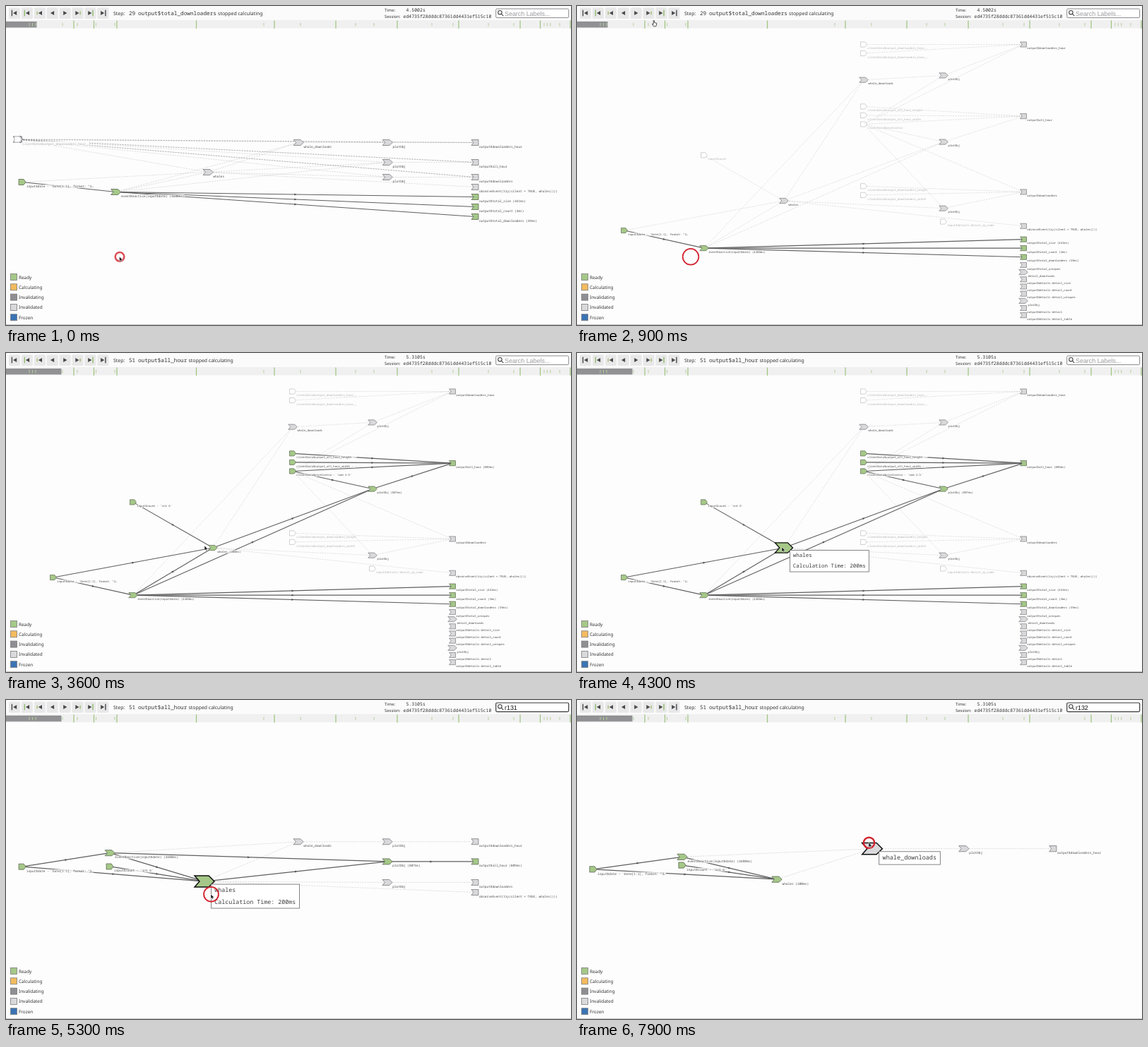
An HTML page with a canvas for the animation above (8 s loop, 800 by 452 pixels).

```html
<!DOCTYPE html>
<html lang="en">
<head>
<meta charset="utf-8">
<title>Reactive graph</title>
<style>
html, body { margin: 0; width: 100%; height: 100%; overflow: hidden; background: #fdfdfd; }
canvas { display: block; width: 800px; height: 452px; }
</style>
</head>
<body>
<canvas id="stage"></canvas>
<script>
const LOOP = 8000;
const STEP_AT = 1450, HOVER_1 = 3800, FILTER_1 = 4620, HOVER_2 = 7400, FILTER_2 = 7720;
const MONO = '"Noto Sans Mono", "DejaVu Sans Mono", monospace';
const SANS = '"Noto Sans", "Open Sans", sans-serif';
const UI = '"Liberation Sans", Arial, sans-serif';
const BG = '#fdfdfd', INK = '#333', GREEN = '#a5c888', GREY = '#d9d9dc';

const canvas = document.getElementById('stage');
const ctx = canvas.getContext('2d');
const dpr = window.devicePixelRatio || 1;
canvas.width = 800 * dpr;
canvas.height = 452 * dpr;

const clamp = v => Math.max(0, Math.min(1, v));
const ease = v => { const p = clamp(v); return p * p * (3 - 2 * p); };
const mix = (a, b, p) => a + (b - a) * p;
const clip = s => s.length > 36 ? s.slice(0, 35) + '…' : s;

// Each layout is a grid: x of a column, y of the first row, row height, zoom
const layouts = [
  { x: c => 23 + 128.2 * c + 1.1 * c * (5 - c), top: 193.5, row: 14, zoom: 1 },
  { x: c => 67 + 113 * c, top: 54.5, row: 12.55, zoom: .895 },
  { x: c => [23, 147, 281, 414, 540, 664][c], top: 201, row: 14, zoom: 1 },
  { x: c => [23, 159, 293, 438, 587, 723][c], top: 211, row: 14, zoom: 1.12 },
];
const starts = [50, FILTER_1, FILTER_2];
const NEW = [17, 189];

const nodes = [];
const byId = {};

// ready: 0 never, 1 always, 2 after the step; rows: one per layout, null for a node not yet placed
function node(id, kind, label, ready, col, rows, late = label) {
  const ghost = kind === 'in' && ready !== 1;
  nodes.push(byId[id] = { kind, label: clip(label), late: clip(late), ready, col, rows, ghost });
}

['$total_uniques', 'detail_downloads', '$details-detail_size', '$details-detail_count',
 '$details-detail_uniques', 'plotObj', '$details-detail', '$details-detail_table'].forEach((s, i) => {
  const out = s[0] === '$';
  node('d' + i, out ? 'out' : 'mid', out ? 'output' + s : s, 0, 5, [null, 24.9 + .81 * i]);
});

node('ip', 'in', 'input$details-detail_ip_name', 0, 4, [null, 20]);
node('n', 'in', 'input$count', 2, 1, [null, 12.5, 2.5, 0], "input$count - 'int 6'");
node('px', 'in', 'clientData$pixelratio', 2, 3, [null, 9], "clientData$pixelratio - 'num 2.5'");
[['l', 'downloaders', 16, 0], ['a', 'all_hour', 7, 2], ['h', 'downloaders_hour', 0, 0]]
  .forEach(([id, name, row, ready]) => ['width', 'height'].forEach((side, i) => {
    const label = `clientData$output_${name}_${side}`;
    node(id + side[0], 'in', label, ready, 3, [null, row + 1 - i], label + (ready ? ' - int' : ''));
  }));

node('date', 'in', 'input$date - \'Date[1:1], format: "2019"', 1, 0, [4, 21, 2.5, 2.5]);
node('event', 'mid', 'eventReactive(input$date) (4480ms)', 1, 1, [5, 23, 1.1, 2]);
node('whales', 'mid', 'whales', 2, 2, [3, 17.65, 4, 1.1], 'whales (200ms)');
node('wd', 'mid', 'whale_downloads', 0, 3, [0, 4, 0, 2.5]);
node('p1', 'mid', 'plotObj', 0, 4, [0, 3.5, 0, 2.5]);
node('p2', 'mid', 'plotObj', 2, 4, [2, 11, 2], 'plotObj (807ms)');
node('p3', 'mid', 'plotObj', 0, 4, [3.5, 18.5, 4.1]);
node('o1', 'out', 'output$downloaders_hour', 0, 5, [0, 0, 0, 2.5]);
node('o2', 'out', 'output$all_hour', 2, 5, [2, 8.1, 2], 'output$all_hour (809ms)');
node('o3', 'out', 'output$downloaders', 0, 5, [3.5, 16.65, 4.1]);
node('obs', 'out', 'x', 0, 5, [4.5, 20.5, 5.1]);
byId.obs.label = byId.obs.late = 'observeEvent(try(silent = TRUE, whales()))';
['size (441ms)', 'count (3ms)', 'downloaders (39ms)'].forEach((s, i) =>
  node('t' + i, 'out', 'output$total_' + s, 1, 5, [5.5 + i, 22 + i]));

const edges = ('date-event date-whales n-whales event-whales event-wd whales-wd event-p2 whales-p2 ' +
  'whales-p3 whales-obs wd-p1 p1-o1 p2-o2 p3-o3 hh-o1 hw-o1 ah-o2 aw-o2 lh-o3 lw-o3 ' +
  'px-p1 px-o1 px-p2 px-o2 px-p3 px-o3 event-t0 event-t1 event-t2')
  .split(' ').map(s => s.split('-').map(id => byId[id]));

const shapes = {
  in: [[-5, -4], [2, -4], [5, 0], [2, 4], [-5, 4]],
  mid: [[-7, -4], [3, -4], [7, 0], [3, 4], [-7, 4], [-3.5, 0]],
  out: [[-5, -4], [5, -4], [5, 4], [-5, 4], [-2, 0]],
};
const arrow = [[0, 0], [0, 6.6], [1.5, 5.3], [2.5, 7.6], [3.6, 7.1], [2.6, 4.9], [4.7, 4.8]];
const hand = [[0, 0], [1.2, 0], [1.5, 2.8], [4.6, 3.6], [4.4, 6.2], [3.5, 8], [.4, 8], [-1.8, 4.8], [0, 5]];

// Pointer travel: start, end, x, y
const travel = [
  [120, 500, 117, 94], [500, 1010, 107, 11], [2000, 3200, 281, 273],
  [3600, 3900, 290, 275], [5300, 6200, 257, 350], [6700, 7500, 413, 202],
];
const clicks = [0, 1400, FILTER_1 - 52, FILTER_2 - 52];

function rect(x, y, w, h, fill) {
  ctx.fillStyle = fill;
  ctx.fillRect(x, y, w, h);
}

function poly(points, fill, stroke, width) {
  ctx.beginPath();
  points.forEach(([x, y]) => ctx.lineTo(x, y));
  ctx.closePath();
  ctx.fillStyle = fill;
  ctx.fill();
  if (stroke) { ctx.strokeStyle = stroke; ctx.lineWidth = width; ctx.stroke(); }
}

const shift = (points, x, y, k = 1) => points.map(([a, b]) => [x + a * k, y + b * k]);

// Text is set large and scaled down so that small sizes keep even spacing
function text(str, x, y, size, font, color = INK) {
  ctx.save();
  ctx.translate(x, y);
  ctx.scale(size / 40, size / 40);
  ctx.font = '40px ' + font;
  ctx.fillStyle = color;
  ctx.fillText(str, 0, 0);
  ctx.restore();
}

function spot(n, i) {
  const l = layouts[i];
  return n.rows[i] === null ? NEW : [l.x(n.col), l.top + l.row * n.rows[i]];
}

function view(t) {
  const i = t < FILTER_1 ? 0 : t < FILTER_2 ? 1 : 2;
  const e = ease((t - starts[i]) / 700);
  return {
    z: mix(layouts[i].zoom, layouts[i + 1].zoom, e),
    shown: n => n.rows.length > i + 1,
    at: n => {
      const [x1, y1] = spot(n, i), [x2, y2] = spot(n, i + 1);
      return [mix(x1, x2, e), mix(y1, y2, e) + 16 * e * (1 - e)];
    },
  };
}

function drawEdge([x1, y1], [x2, y2], on, z) {
  ctx.beginPath();
  ctx.moveTo(x1, y1);
  ctx.lineTo(x2, y2);
  ctx.setLineDash(on ? [] : [2.4, 1.2]);
  ctx.strokeStyle = on ? '#5f5f61' : 'rgba(100,100,105,.27)';
  ctx.lineWidth = (on ? 1.25 : .7) * z;
  ctx.stroke();
  ctx.setLineDash([]);
  if (!on) return;
  ctx.save();
  ctx.translate((x1 + x2) / 2, (y1 + y2) / 2);
  ctx.rotate(Math.atan2(y2 - y1, x2 - x1));
  poly([[-1.5, -1.5], [1.7, 0], [-1.5, 1.5]], '#505052');
  ctx.restore();
}

function drawGraph(t) {
  const v = view(t), z = v.z, late = t >= STEP_AT;
  const big = t >= HOVER_2 ? byId.wd : t >= HOVER_1 ? byId.whales : null;
  const ready = n => n.ready === 1 || (n.ready === 2 && late);
  const live = ([a, b]) => ready(a) && ready(b);
  const list = nodes.filter(n => v.shown(n) && n !== big);

  edges.filter(([a, b]) => v.shown(a) && v.shown(b))
    .sort((p, q) => live(p) - live(q))
    .forEach(e => drawEdge(v.at(e[0]), v.at(e[1]), live(e), z));

  for (const n of list) {
    const [x, y] = v.at(n), str = late ? n.late : n.label;
    const lx = x + (n.kind === 'mid' ? 7.3 : 6) * z, size = 4.4 * z;
    rect(lx, y + 3.7 * z, str.length * size * .6, 4.8 * z, 'rgba(253,253,253,.8)');
    text(str, lx, y + 7.5 * z, size, MONO, n.ghost && !ready(n) ? '#b4b4b6' : '#4c4c4e');
  }
  for (const n of list) {
    const [x, y] = v.at(n), on = ready(n);
    const [fill, line] = on ? [GREEN, '#65705c']
      : n.ghost ? ['rgba(255,255,255,.8)', '#c2c2c4'] : [GREY, '#828285'];
    poly(shift(shapes[n.kind], x, y, z), fill, line, .85 * z);
  }
  if (big) drawHover(big, v.at(big), z, ready(big));
}

function drawHover(n, [x, y], z, on) {
  poly(shift(shapes[n.kind], x, y, 2 * z), on ? GREEN : GREY, '#111', 1.5 * z);
  const lines = on ? [n.label, 'Calculation Time: 200ms'] : [n.label];
  const chars = Math.max(...lines.map(s => s.length));
  const w = (chars * 5 + 10) * z, h = (on ? 34 : 18) * z;
  const bx = x + 9.5 * z, by = y + 4 * z;
  rect(bx, by, w, h, '#fff');
  ctx.strokeStyle = '#77777a';
  ctx.lineWidth = .9;
  ctx.strokeRect(bx, by, w, h);
  lines.forEach((s, i) => text(s, bx + 4.8 * z, by + (11 + 16.5 * i) * z, 8.33 * z, MONO, '#3c3c3e'));
}

function drawButton(i) {
  const cx = 12 + i * 17.9, dir = i < 4 ? -1 : 1;
  const kind = i < 4 ? i : 7 - i;
  ctx.beginPath();
  ctx.roundRect(cx - 8, 2.5, 16, 15.5, 1.5);
  ctx.fillStyle = '#e8e8e9';
  ctx.fill();
  const back = kind === 3 ? 2.4 : 3.2;
  poly(shift([[5.2, 0], [0, -2.9], [0, 2.9]], cx - dir * back, 10)
    .map(([x, y]) => [cx - dir * back + dir * (x - cx + dir * back), y]), '#48484a');
  if (kind === 3) return;
  const h = kind === 2 ? 4.6 : 8.6;
  rect(cx + dir * 3.6 - .7, 10 - h / 2, 1.4, h, ['#48484a', '#8fbb6c', '#9fbf6c'][kind]);
}

function drawTimeline(late) {
  rect(0, 20, 800, 11.5, '#f0f0f1');
  rect(0, 22, late ? 78.5 : 43.5, 8.5, '#919194');
  const tall = x => rect(x - .6, 20.5, 1.2, 11.5, '#9dc37c');
  const short = x => rect(x - .5, 24, 1, 4.5, '#b5cf9c');
  [96, 124.5, 157, 269.5, 756.5, 799].forEach(tall);
  [80, 101, 127.5, 154, 365, 417, 495, 521, 603, 633, 683, 719, 784].forEach(short);
  for (let i = 0; i < 5; i++) tall(380 + 87 * i);
  for (let i = 0; i < 3; i++) {
    short(33 + 4.5 * i);
    short(762 + 4.4 * i);
  }
}

function drawHeader(t) {
  const late = t >= STEP_AT;
  rect(0, 0, 800, 20, '#fbfbfc');
  drawTimeline(late);
  for (let i = 0; i < 8; i++) drawButton(i);

  const name = late ? 'output$all_hour' : 'output$total_downloaders';
  text('Step:', 152, 13, 6.9, SANS);
  text(late ? '51' : '29', 174, 13, 7.6, MONO);
  text(name, 187, 13, 7.7, MONO);
  text('stopped calculating', 189 + name.length * 4.63, 13, 6.9, SANS);
  text('Time:', 536, 8, 5.9, SANS);
  text(late ? '5.3105s' : '4.5002s', 566.5, 8, 6.5, MONO);
  text('Session:', 536, 17, 5.9, SANS);
  text('ed4735f28dddc87361dd4431ef515c10', 562.5, 17, 6.5, MONO);

  const query = t >= FILTER_2 ? 'r132' : t >= FILTER_1 ? 'r131' : '';
  ctx.beginPath();
  ctx.roundRect(693.7, 4, 103, 12.6, 1.5);
  ctx.fillStyle = '#fff';
  ctx.fill();
  ctx.strokeStyle = query ? '#3a3a3c' : '#8c8c8f';
  ctx.lineWidth = query ? 1.2 : 1;
  ctx.stroke();
  ctx.beginPath();
  ctx.arc(699.4, 9.2, 2.7, 0, 7);
  ctx.moveTo(701.4, 11.2);
  ctx.lineTo(704.3, 14.2);
  ctx.strokeStyle = '#444';
  ctx.lineWidth = 1.1;
  ctx.stroke();
  text(query || 'Search Labels...', 706, 13.6, 8.9, UI, query ? '#111' : '#9a9a9d');
}

function drawLegend() {
  const rows = [['Ready', GREEN], ['Calculating', '#f3bb5e'], ['Invalidating', '#8f8f93'],
    ['Invalidated', GREY], ['Frozen', '#3b74b4']];
  rows.forEach(([label, color], i) => {
    const y = 384 + i * 14.3;
    rect(6.5, y - 4.5, 9, 9, color);
    ctx.strokeStyle = '#7c7c7e';
    ctx.lineWidth = .8;
    ctx.strokeRect(6.5, y - 4.5, 9, 9);
    text(label, 18, y + 2.5, 6.4, SANS);
  });
  rect(0, 451, 800, 1, '#c4c4c6');
}

function pointerAt(t) {
  return travel.reduce(([x, y], [from, to, x2, y2]) => {
    const p = ease((t - from) / (to - from));
    return [mix(x, x2, p), mix(y, y2, p)];
  }, [160.5, 355]);
}

function drawPointer(t) {
  for (const at of clicks) {
    const dt = t - at;
    if (dt < -80 || dt > 1100) continue;
    const [x, y] = pointerAt(at);
    ctx.beginPath();
    ctx.arc(x + .5, y + .3, 6.3 + dt * .0056, 0, 7);
    ctx.globalAlpha = clamp((dt + 150) / 190) * (1 - clamp((dt - 920) / 180));
    ctx.strokeStyle = '#d3232e';
    ctx.lineWidth = 2.6 - dt * .001;
    ctx.stroke();
    ctx.globalAlpha = 1;
  }
  const [x, y] = pointerAt(t);
  ctx.lineJoin = 'round';
  if (y < 24) poly(shift(hand, x, y), '#fff', '#222', .8);
  else poly(shift(arrow, x, y), '#111', 'rgba(255,255,255,.8)', .6);
  ctx.lineJoin = 'miter';
}

function draw(t) {
  ctx.setTransform(dpr, 0, 0, dpr, 0, 0);
  ctx.textRendering = 'geometricPrecision';
  rect(0, 0, 800, 452, BG);
  drawGraph(t);
  drawHeader(t);
  drawLegend();
  drawPointer(t);
}

const begin = performance.now();
function tick() {
  draw((performance.now() - begin) % LOOP);
  requestAnimationFrame(tick);
}
tick();
</script>
</body>
</html>
```
